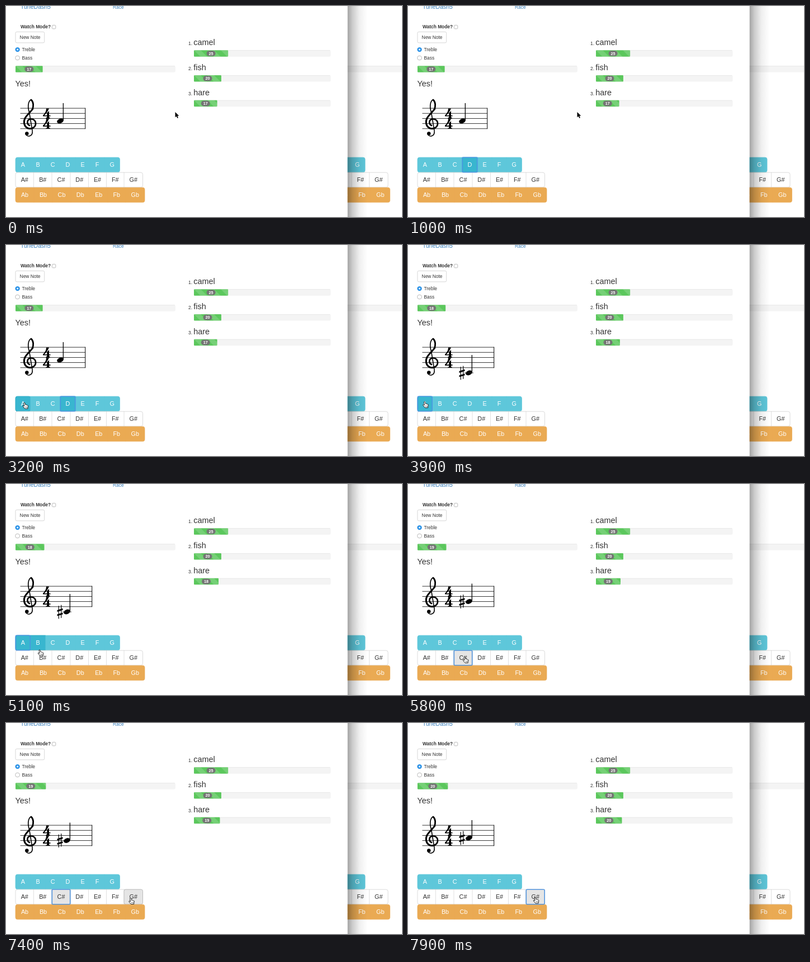
Recreate the animation shown at these times as an HTML page. Size 708 by 378 pixels, loop 8000 ms.

```html
<!DOCTYPE html>
<html lang="en">
<head>
<meta charset="utf-8">
<title>Note race</title>
<style>
  html, body { margin: 0; width: 100%; height: 100%; overflow: hidden; background: #fff; }
  svg { display: block; width: 708px; height: 378px; }
  text { font-family: "Liberation Sans", Arial, sans-serif; font-size: 8.4px; fill: #333; }
  .title { font-size: 14.4px; }
  .key { font-size: 10.8px; text-anchor: middle; }
  .badge { font-size: 7.2px; font-weight: bold; text-anchor: middle; fill: #fff; }
  .link { fill: #387fbd; }
  .ink { fill: none; stroke: #000; stroke-linecap: round; }
</style>
</head>
<body>
<svg id="stage" viewBox="0 0 708 378">
  <defs>
    <pattern id="stripes" width="24" height="12" patternUnits="userSpaceOnUse">
      <path d="M0 0H12L24 12H12Z" fill="#fff" fill-opacity=".16"/>
    </pattern>
    <linearGradient id="shadow">
      <stop offset="0" stop-opacity=".36"/>
      <stop offset=".25" stop-opacity=".2"/>
      <stop offset=".6" stop-opacity=".06"/>
      <stop offset="1" stop-opacity="0"/>
    </linearGradient>
  </defs>
  <g id="scene"></g>
</svg>
<script>
const LOOP = 8000, STEP = 100;
const scene = document.getElementById('scene');

const rows = [
  { y: 271, edges: [17, 43.5, 70.5, 97, 124, 150, 176, 203.5], suffix: '',
    fill: '#5ec7da', hot: '#39b6cf', edge: '#5ec7da', hotEdge: '#31aac4', ink: '#fff' },
  { y: 298, edges: [17, 49.5, 82, 115, 147.5, 179.5, 211, 244.5], suffix: '#',
    fill: '#fff', hot: '#e5e5e5', edge: '#ccc', hotEdge: '#adadad', ink: '#333' },
  { y: 325, edges: [17, 50, 83, 116, 149.5, 182, 213.5, 248], suffix: 'b',
    fill: '#eaaa53', hot: '#e2962f', edge: '#eaaa53', hotEdge: '#d58512', ink: '#fff' }
];
const KEY_H = 27;

// Pointer tip: [time, x, y]
const pointerPath = [
  [0, 302.5, 190], [1500, 302.5, 190], [1600, 215, 205], [1700, 100, 216], [1800, 100, 216],
  [1900, 80, 235], [2000, 66, 248], [2100, 57, 255.5], [2200, 45, 292], [2300, 33, 323],
  [2400, 34, 293], [2500, 36, 284], [3000, 36, 284], [3400, 29.5, 280.5], [4900, 29.5, 280.5],
  [5000, 40, 286], [5100, 60, 297], [5200, 96, 323], [5300, 143, 316], [5400, 112, 311],
  [5500, 101, 309.5], [6900, 101, 309.5], [7000, 124, 309], [7100, 168, 308], [7300, 218, 315],
  [7500, 227, 312], [8000, 227, 312]
];

const focusSteps = [[0, ''], [900, 'D'], [3600, 'A'], [5700, 'C#'], [7700, 'G#']];
const rounds = [
  { at: -1000, score: 17, noteY: 206, sharp: false },
  { at: 3700, score: 18, noteY: 229, sharp: true },
  { at: 5800, score: 19, noteY: 210.5, sharp: true },
  { at: 7900, score: 20, noteY: 206, sharp: true }
];

const label = (x, y, s, cls = '', extra = '') =>
  `<text x="${x}" y="${y}" class="${cls}" ${extra}>${s}</text>`;
const rect = (x, y, w, h, fill, extra = '') =>
  `<rect x="${x}" y="${y}" width="${w}" height="${h}" fill="${fill}" ${extra}/>`;
const stroke = (d, width) => `<path class="ink" d="${d}" stroke-width="${width}"/>`;

function pointerAt(t) {
  const i = pointerPath.findIndex(p => p[0] > t);
  const [t0, x0, y0] = pointerPath[i - 1], [t1, x1, y1] = pointerPath[i];
  const k = (t - t0) / (t1 - t0);
  return { x: x0 + (x1 - x0) * k, y: y0 + (y1 - y0) * k };
}

const keyNames = row => [...'ABCDEFG'].map(c => c + row.suffix);

function keyUnder({ x, y }) {
  const row = rows.find(r => y >= r.y && y < r.y + KEY_H);
  return row && keyNames(row).find((_, i) => x >= row.edges[i] && x < row.edges[i + 1]);
}

function keyboard(focus, hover) {
  let out = '', ring = '';
  for (const row of rows) {
    const { y, edges } = row, left = edges[0], right = edges[7];
    out += rect(left, y + .2, right - left, KEY_H - .4, row.fill, `rx="3.6" stroke="${row.edge}" stroke-width=".7"`);
    keyNames(row).forEach((name, i) => {
      const x = edges[i], w = edges[i + 1] - x;
      if (i) out += rect(x - .3, y, .6, KEY_H, row.edge);
      if (name === focus || name === hover)
        out += rect(x, y + .2, w, KEY_H - .4, row.hot, `rx="${i % 6 ? 0 : 3}" stroke="${row.hotEdge}" stroke-width=".7"`);
      if (name === focus)
        ring = rect(x + .3, y + .3, w - .6, KEY_H - .6, 'none', 'rx="1.5" stroke="#4b93e3" stroke-width="1.6" stroke-opacity=".9"');
      out += label(x + w / 2, y + 17.4, name, 'key', `style="fill:${row.ink}"`);
    });
  }
  return out + ring;
}

function progress(x, y, width, value, score) {
  const w = width * value / 100;
  return `<g transform="translate(${x} ${y})">` +
    rect(0, 0, width, 11.5, '#f4f4f4', 'rx="2.2"') +
    rect(1, 0, width - 2, .8, '#e6e6e6') +
    rect(0, 0, w, 11.5, '#5bc75c', 'rx="1.2"') + rect(0, 0, w, 11.5, 'url(#stripes)') +
    rect(w / 2 - 8, 1, 16, 9.6, '#747474', 'rx="4.8"') +
    label(w / 2, 8.4, score, 'badge') + '</g>';
}

function clef() {
  return stroke('M48 184C41 194 31 199 32.5 210C33.5 217 39 220.5 45 219.5', 3) +
    stroke('M41.5 190C37.5 178 41 169 45 168', 1.7) +
    stroke('M45 168C49.5 172 49.5 180 47 185.5', 2.8) +
    stroke('M45 219.5C56 218 55.5 202.5 45 202.5C37 202.5 36.5 211 42 214', 2.7) +
    stroke('M41.5 190L47 223C48.5 234 38 236 35 229', 1.6) +
    '<circle cx="37.3" cy="228.5" r="3.2"/>';
}

function staff({ noteY, sharp }) {
  const end = sharp ? 154 : 142, x = sharp ? 109 : 97;
  const four = 'M72 183.5H77C75 189 71.5 193 68.5 196H73.3V191.5L77 188V196H79.5V197.6H77C77 199.8 77.5 200.5 79 200.6V201.6H71V200.6C73 200.5 73.3 199.5 73.3 197.6H66V196C70 192 72 188 72 183.5Z';
  let out = '';
  for (let i = 0; i < 5; i++) out += rect(25.5, 182.7 + i * 9.15, end - 25.5, .9, '#222');
  out += rect(end - .8, 182.7, 1, 37.5, '#000') + clef() +
    `<path d="${four}"/><path d="${four}" transform="translate(0 18.3)"/>` +
    `<ellipse cx="${x}" cy="${noteY}" rx="6.1" ry="4.1" transform="rotate(-22 ${x} ${noteY})"/>` +
    rect(x + 4.7, noteY - 32, 1.3, 31, '#000');
  if (noteY > 225) out += rect(x - 8, noteY - .4, 16, .9, '#222');
  if (sharp)
    out += `<g transform="translate(96.5 ${noteY})">` +
      stroke('M-2.2 -10.5V12M2.2 -12V10.5', 1.2) +
      '<path d="M-5 -3L5 -6.2V-3.2L-5 0ZM-5 4.6L5 1.4V4.4L-5 7.6Z"/></g>';
  return out;
}

function controls() {
  return label(26, 5.2, 'TuneDash5', 'link', 'style="font-size:10.5px"') + label(191, 5, 'Race', 'link') +
    label(26, 40.2, 'Watch Mode?', '', 'font-weight="bold"') +
    rect(82.4, 34.4, 6.4, 6.4, '#fff', 'rx="1.4" stroke="#aaa" stroke-width=".8"') +
    rect(17, 46.3, 51.7, 19.6, '#fff', 'rx="2.4" stroke="#ccc" stroke-width=".8"') +
    label(24.6, 59, 'New Note') +
    '<circle cx="20.6" cy="78.1" r="4.2" fill="#2c93e8"/><circle cx="20.6" cy="78.1" r="1.5" fill="#fff"/>' +
    '<circle cx="20.6" cy="93" r="3.9" fill="#fff" stroke="#aaa" stroke-width=".8"/>' +
    label(28.5, 80.7, 'Treble') + label(28.5, 95.6, 'Bass') + label(16.6, 143.8, 'Yes!', 'title');
}

function pointer({ x, y }, isHand) {
  const shape = isHand
    ? '<path d="M-1 .8Q0 -.7 1.2 .8L2 4Q3.2 3.2 3.7 4.4Q5 3.8 5.4 5Q7 4.8 6.9 6.5L6.2 9V11H1L-2.4 7Q-3.2 5.4 -1.8 5.3L0 6.5Z" fill="#fff" stroke="#111" stroke-width=".9" stroke-linejoin="round"/><path d="M2 7.2V9.4M3.6 7.2V9.4M5 7.2V9.4" stroke="#111" stroke-width=".5"/>'
    : '<path d="M0 0V9.4L2.2 7.4L3.8 11L5.4 10.3L3.9 6.8H6.8Z" stroke="#fff" stroke-width="1" paint-order="stroke"/>';
  return `<g transform="translate(${x} ${y})">${shape}</g>`;
}

function draw(t) {
  const now = rounds.findLastIndex(r => r.at <= t), round = rounds[now];
  const from = now ? rounds[now - 1].score : round.score;
  const k = Math.min(1, (t - round.at) / 600);
  const value = from + (round.score - from) * (1 - (1 - k) ** 2);
  const focus = focusSteps.findLast(s => s[0] <= t)[1];
  const tip = pointerAt(t), hover = keyUnder(tip);

  const racers = [['camel', 25, 25], ['fish', 20, 20], ['hare', value, round.score]];
  const board = racers.map(([name, val, score], i) => {
    const y = 70 + i * 45;
    return label(326, y, `${i + 1}.`) + label(335.3, y + .2, name, 'title') +
      progress(336, y + 9.2 - i * .2, 244.5, val, score);
  }).join('');

  scene.innerHTML =
    `<g transform="translate(438.5 0)">${progress(17, 107.3, 286, 17, 17)}${keyboard()}</g>` +
    rect(610.5, 0, 36, 378, 'url(#shadow)') + rect(0, 0, 610.5, 378, '#fff') +
    controls() + progress(17, 107.3, 286, value, round.score) + board +
    staff(round) + keyboard(focus, hover) + pointer(tip, hover);
}

let shown = -1;
function tick() {
  const t = Math.floor(performance.now() % LOOP / STEP) * STEP;
  if (t !== shown) draw(shown = t);
  requestAnimationFrame(tick);
}
tick();
</script>
</body>
</html>
```
